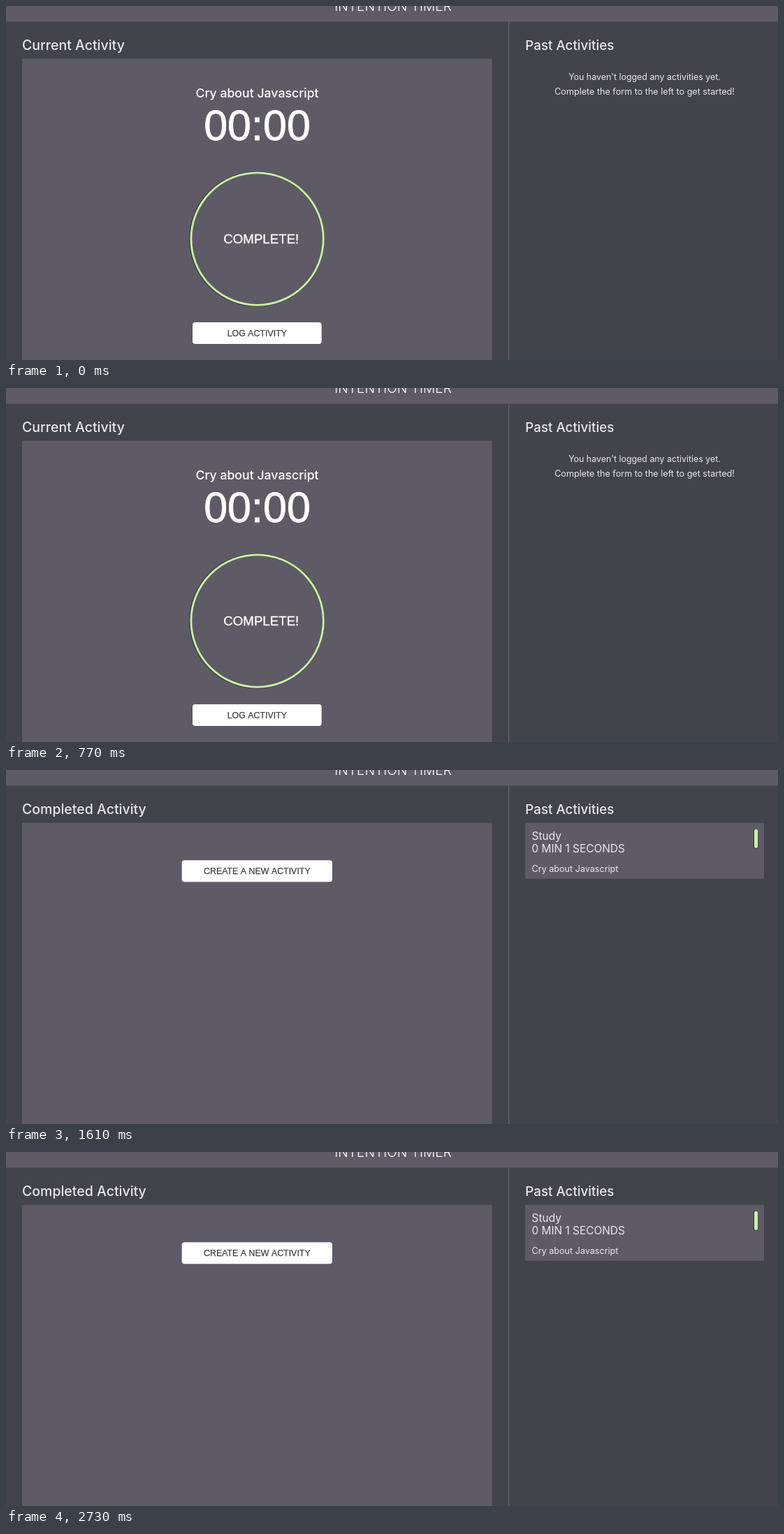
An HTML page with a canvas for the animation above (2800 ms loop, 1105 by 507 pixels).

```html
<!DOCTYPE html>
<html lang="en">
<head>
<meta charset="utf-8">
<title>Intention timer</title>
<style>
  html, body { margin: 0; width: 100%; height: 100%; overflow: hidden; background: #43434b; }
  canvas { display: block; width: 1105px; height: 507px; }
</style>
</head>
<body>
<canvas id="stage" width="1105" height="507"></canvas>
<script>
const ctx = document.getElementById('stage').getContext('2d');
const LOOP = 2800;
const LOGGED_AT = 1610;
const UI = 'Inter, sans-serif';
const SANS = '"Liberation Sans", Arial, sans-serif';
const color = {
  page: '#43434b', panel: '#5f5b66', line: '#65626d', pale: '#e9e5ee',
  white: '#ffffff', ink: '#42404a', green: '#cbf3a5', shade: '#393941'
};

function box(x, y, w, h, radius, fill) {
  ctx.fillStyle = fill;
  ctx.beginPath();
  ctx.roundRect(x, y, w, h, radius);
  ctx.fill();
}

// "heft" thickens the glyphs with a thin outline.
function text(str, x, y, size, { weight = 400, family = UI, fill = color.pale, align = 'left', heft = 0 } = {}) {
  ctx.font = `${weight} ${size}px ${family}`;
  ctx.fillStyle = ctx.strokeStyle = fill;
  ctx.textAlign = align;
  ctx.fillText(str, x, y);
  if (heft) {
    ctx.lineWidth = heft;
    ctx.strokeText(str, x, y);
  }
}

function ring(x, y, radius, width, stroke) {
  ctx.strokeStyle = stroke;
  ctx.lineWidth = width;
  ctx.beginPath();
  ctx.arc(x, y, radius, 0, Math.PI * 2);
  ctx.stroke();
}

function button(label, x, y, w, h) {
  box(x, y, w, h, 4, color.white);
  text(label, x + w / 2, y + 19.5, 12.4, { family: SANS, fill: color.ink, align: 'center', heft: 0.25 });
}

function drawFrame(title) {
  box(0, 0, 1105, 507, 0, color.page);
  box(0, 0, 1105, 22.5, 0, color.panel);
  box(719, 22.5, 1.3, 485, 0, color.line);
  box(23, 75.5, 672.7, 440, 2, color.panel);
  text('INTENTION TIMER', 554, 6.5, 19.2, { weight: 300, fill: color.white, align: 'center' });
  text(title, 23, 63, 19.5, { weight: 450 });
  text('Past Activities', 743.3, 63, 18.8, { weight: 450 });
}

function drawTimer() {
  const centered = { fill: color.white, align: 'center' };
  drawFrame('Current Activity');
  text('Cry about Javascript', 359.5, 131, 17.7, { ...centered, weight: 450 });
  text('00:00', 359.5, 192, 61, { ...centered, family: SANS, heft: 0.8 });
  ring(359, 333.8, 95.2, 3.2, color.shade);
  ring(359.6, 333.6, 94.7, 2.8, color.green);
  text('COMPLETE!', 311.3, 340, 18.7, { family: SANS, fill: color.white, heft: 0.3 });
  button('LOG ACTIVITY', 267, 453, 184.7, 31);
  text("You haven't logged any activities yet.", 914, 105.5, 12.4, { align: 'center' });
  text('Complete the form to the left to get started!', 914, 126.5, 12.6, { align: 'center' });
}

function drawLogged() {
  drawFrame('Completed Activity');
  button('CREATE A NEW ACTIVITY', 251.7, 129.2, 215.3, 31);
  box(743, 75.5, 342, 80.3, 2, color.panel);
  text('Study', 752.5, 99.5, 15.5);
  text('0 MIN 1 SECONDS', 752.5, 118, 15.4);
  text('Cry about Javascript', 752.5, 146, 12.6);
  box(1069.8, 84, 6.4, 28.5, 2, color.shade);
  box(1071, 84.8, 5, 27, 2, color.green);
}

function render(now) {
  if (now % LOOP < LOGGED_AT) drawTimer();
  else drawLogged();
  requestAnimationFrame(() => render(performance.now() - start));
}

const start = performance.now();
render(0);
</script>
</body>
</html>
```
